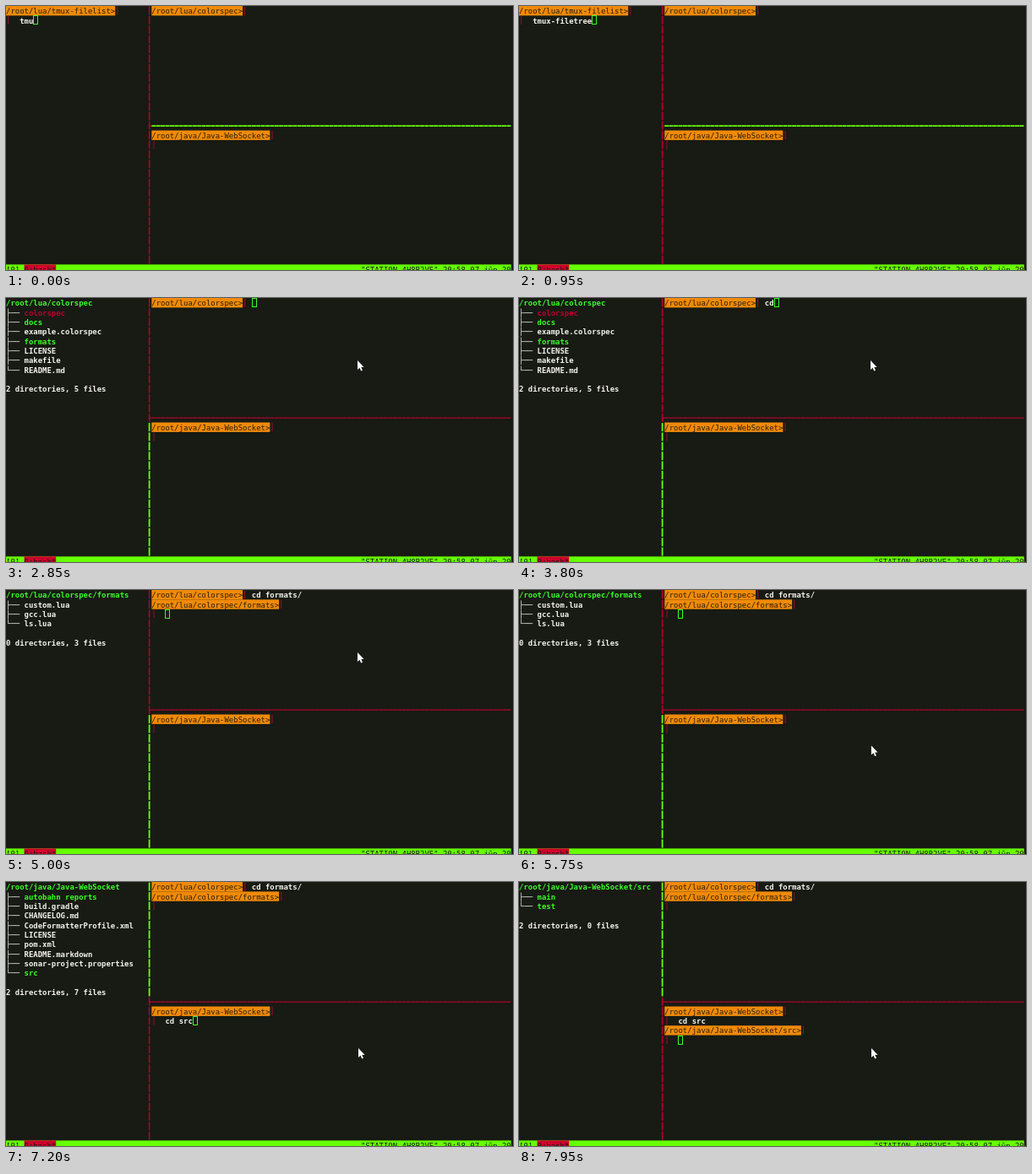
Write an HTML page with a canvas that moves like this. It is 600 by 313 pixels and loops after 8000 ms.

```html
<!DOCTYPE html>
<html lang="en">
<head>
<meta charset="utf-8">
<title>tmux file tree</title>
<style>
  html, body { margin: 0; width: 100%; height: 100%; overflow: hidden; background: #181a14; }
  canvas { display: block; width: 600px; height: 313px; }
</style>
</head>
<body>
<canvas id="stage" width="600" height="313"></canvas>
<script>
const ctx = document.getElementById('stage').getContext('2d');
const LOOP = 8000;
const CELL_W = 5.385, CELL_H = 11.35;
const COLS = 111, SPLIT_COL = 31, PANE_COL = 32, SPLIT_ROW = 12, STATUS_ROW = 27;
const COLOR = {
  back: '#181a14', white: '#f4f4ec', lime: '#66ff00', green: '#38ff28',
  red: '#bd0030', dimRed: '#98102a', orange: '#f08a08', ink: '#2a1d0a'
};
const FONT = '8.95px "DejaVu Sans Mono", monospace';

// Entries marked "/" are directories, "!" is an executable.
const trees = {
  tmux: { path: '/root/lua/tmux-filelist', summary: '0 directories, 4 files',
    items: ['LICENSE', 'makefile', 'README.md', 'tmux-filetree.lua'] },
  colorspec: { path: '/root/lua/colorspec', summary: '2 directories, 5 files',
    items: ['colorspec!', 'docs/', 'example.colorspec', 'formats/', 'LICENSE', 'makefile', 'README.md'] },
  formats: { path: '/root/lua/colorspec/formats', summary: '0 directories, 3 files',
    items: ['custom.lua', 'gcc.lua', 'ls.lua'] },
  socket: { path: '/root/java/Java-WebSocket', summary: '2 directories, 7 files',
    items: ['autobahn reports/', 'build.gradle', 'CHANGELOG.md', 'CodeFormatterProfile.xml', 'LICENSE',
      'pom.xml', 'README.markdown', 'sonar-project.properties', 'src/'] },
  src: { path: '/root/java/Java-WebSocket/src', summary: '2 directories, 0 files',
    items: ['main/', 'test/'] }
};

const time = {
  run: 1300, mouseIn: 2200, clickTop: 2550, showTop: 2700,
  enterTop: 4600, showFormats: 4800,
  mouseDown: 5350, clickBottom: 5950, showSocket: 6100,
  enterBottom: 7450, showSrc: 7650
};

function write(text, col, row, color, bold) {
  ctx.font = (bold ? 'bold ' : '') + FONT;
  ctx.fillStyle = color;
  [...text].forEach((char, i) => ctx.fillText(char, (col + i) * CELL_W, row * CELL_H + 9.2));
}

function block(col, row, width, color) {
  ctx.fillStyle = color;
  ctx.fillRect(col * CELL_W, row * CELL_H, width * CELL_W, CELL_H);
}

function bar(col, row, color, width = 1) {
  ctx.fillStyle = color;
  ctx.fillRect((col + 0.5) * CELL_W - width / 2, row * CELL_H + 0.6, width, CELL_H - 1.4);
}

function prompt(path, col, row) {
  const text = path + '>';
  block(col, row, text.length, COLOR.orange);
  write(text, col, row, COLOR.ink);
  bar(col + text.length, row, COLOR.dimRed);
}

function cursor(col, row) {
  ctx.strokeStyle = COLOR.green;
  ctx.lineWidth = 1;
  ctx.strokeRect(Math.round(col * CELL_W) + 0.5, Math.round(row * CELL_H) + 0.5, 5, 10);
}

function command(text, col, row, active) {
  write(text, col, row, COLOR.white, true);
  if (active) cursor(col + text.length, row);
}

function typed(text, t, start, step) {
  return text.slice(0, Math.max(0, Math.floor((t - start) / step) + 1));
}

function drawTree({ path, items, summary }) {
  write(path, 0, 0, COLOR.green, true);
  items.forEach((item, i) => {
    const mark = item.at(-1);
    const color = mark === '/' ? COLOR.green : mark === '!' ? COLOR.red : COLOR.white;
    write(i === items.length - 1 ? '└──' : '├──', 0, i + 1, COLOR.white);
    write(item.replace(/[/!]$/, ''), 4, i + 1, color, true);
  });
  write(summary, 0, items.length + 2, COLOR.white, true);
}

function drawLeft(t) {
  if (t < time.run) {
    prompt(trees.tmux.path, 0, 0);
    bar(0, 1, COLOR.dimRed);
    command('tmu' + typed('x-filetree', t, 120, 90), 3, 1, true);
    return;
  }
  const name = t < time.showTop ? 'tmux' : t < time.showFormats ? 'colorspec'
    : t < time.showSocket ? 'formats' : t < time.showSrc ? 'socket' : 'src';
  drawTree(trees[name]);
  if (t < time.clickTop) cursor(0, trees.tmux.items.length + 3);
}

function drawTop(t, active) {
  const path = trees.colorspec.path;
  const entered = t >= time.enterTop;
  prompt(path, PANE_COL, 0);
  const text = t < 4250 ? typed('cd f', t, 3550, 180) : 'cd formats/';
  command(text, PANE_COL + path.length + 3, 0, active && !entered);
  if (entered) {
    prompt(trees.formats.path, PANE_COL, 1);
    bar(PANE_COL, 2, COLOR.dimRed);
    command('', PANE_COL + 3, 2, active);
  }
}

function drawBottom(t, active) {
  const entered = t >= time.enterBottom;
  prompt(trees.socket.path, PANE_COL, 13);
  bar(PANE_COL, 14, COLOR.dimRed);
  command(typed('cd src', t, 6600, 120), PANE_COL + 3, 14, active && !entered);
  if (entered) {
    prompt(trees.src.path, PANE_COL, 15);
    bar(PANE_COL, 16, COLOR.dimRed);
    command('', PANE_COL + 3, 16, active);
  }
}

function drawBorders(active) {
  for (let row = 0; row < STATUS_ROW; row++) {
    const idle = active === 'top' ? row > SPLIT_ROW : active === 'bottom' && row < SPLIT_ROW;
    bar(SPLIT_COL, row, idle ? COLOR.lime : COLOR.red, idle ? 1.8 : 1.4);
  }
  const idle = active === 'left';
  const y = (SPLIT_ROW + 0.5) * CELL_H + 0.3;
  const thickness = idle ? 1.8 : 1.2;
  ctx.fillStyle = COLOR.red;
  ctx.fillRect((SPLIT_COL + 0.5) * CELL_W, y - 0.6, CELL_W / 2, 1.2);
  ctx.fillStyle = idle ? COLOR.lime : COLOR.red;
  for (let col = PANE_COL; col < COLS; col++) {
    ctx.fillRect(col * CELL_W, y - thickness / 2, CELL_W - 0.3, thickness);
  }
}

function drawStatus(t) {
  const label = t >= time.run && t < time.clickTop ? '0:lua*' : '0:bash*';
  block(0, STATUS_ROW, COLS, COLOR.lime);
  block(4, STATUS_ROW, label.length, '#d0002c');
  write('[0]', 0, STATUS_ROW, COLOR.back);
  write(label, 4, STATUS_ROW, COLOR.back);
  write('"STATION-4H8R2VE" 20:58 07-jūn-20', 78, STATUS_ROW, COLOR.back);
}

function ease(t, start, end) {
  const p = Math.min(1, Math.max(0, (t - start) / (end - start)));
  return p * p * (3 - 2 * p);
}

function drawMouse(t) {
  if (t < time.mouseIn) return;
  const arrive = ease(t, time.mouseIn, time.clickTop - 50);
  const descend = ease(t, time.mouseDown, time.clickBottom - 100);
  ctx.save();
  ctx.translate(396 + 20 * arrive + descend, 104 - 30 * arrive + 123 * descend);
  ctx.fillStyle = '#fff';
  ctx.fill(new Path2D('M0 0V11L2.5 8.7L4.2 12.6L6 11.8L4.3 8H7.6Z'));
  ctx.restore();
}

function draw(t) {
  const active = t < time.clickTop ? 'left' : t < time.clickBottom ? 'top' : 'bottom';
  ctx.fillStyle = COLOR.back;
  ctx.fillRect(0, 0, 600, 313);
  drawLeft(t);
  drawTop(t, active === 'top');
  drawBottom(t, active === 'bottom');
  drawBorders(active);
  drawStatus(t);
  drawMouse(t);
}

const start = performance.now();
function frame() {
  draw((performance.now() - start) % LOOP);
  requestAnimationFrame(frame);
}
frame();
</script>
</body>
</html>
```
